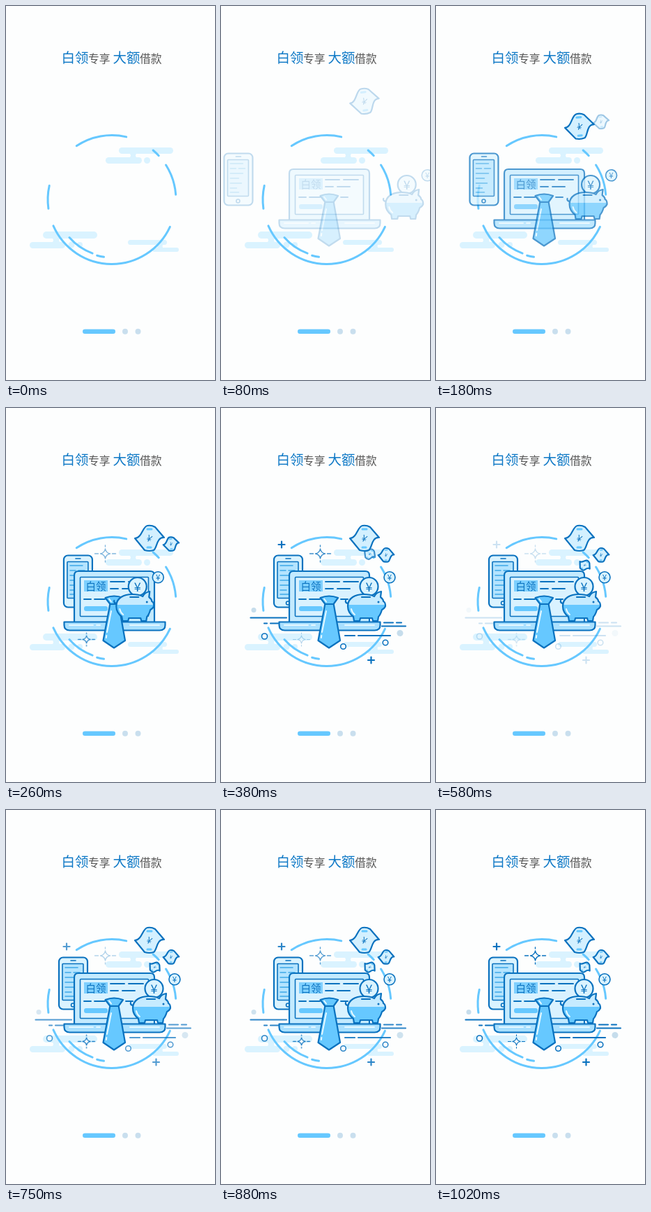
An HTML page for the animation above (1120 ms loop, 300x534 px).

```html
<!DOCTYPE html>
<html lang="zh">
<head>
<meta charset="utf-8">
<style>
  html, body { margin: 0; height: 100%; overflow: hidden; background: #fdfefe; }
  svg { display: block; width: 100vw; height: 100vh; }
  text { font-family: "Noto Sans CJK SC", "Noto Sans CJK", sans-serif; }
  .dark { stroke: #0a72bf; stroke-width: 2.2; stroke-linecap: round; stroke-linejoin: round; }
  .thin { stroke-width: 1.6; }
  .mid { stroke: #66c8ff; stroke-width: 3; stroke-linecap: round; fill: none; }
  .shine { stroke: #e6f8ff; stroke-width: 2; stroke-linecap: round; fill: none; }
  .yen { fill: #0a72bf; text-anchor: middle; font-weight: 500; }
</style>
</head>
<body>
<svg viewBox="0 0 300 534">
  <defs>
    <linearGradient id="twoTone" gradientUnits="userSpaceOnUse" x1="0" x2="0" y1="262" y2="304">
      <stop offset=".45" stop-color="#c6ebff"/>
      <stop offset=".45" stop-color="#66c8ff"/>
    </linearGradient>
    <g id="note">
      <path class="dark" vector-effect="non-scaling-stroke" fill="#d3f0ff"
        d="M-21 0C-11 0 -10 -17 -3 -18Q3 -19 8 -16L21 -1C10 -2 11 14 6 17Q0 19 -7 17Z"/>
      <path d="M-3 -13h6M-3 13h5" stroke="#66c8ff" stroke-width="3" stroke-linecap="round"/>
      <text class="yen" font-size="13" transform="rotate(25)" y="5">¥</text>
    </g>
    <path id="star" class="dark" style="stroke-width:1.4" fill="#fdfefe"
      d="M0 -12V-10M0 10V12M-15 0H-10M15 0H10M0 -7Q1 -1 7 0Q1 1 0 7Q-1 1 -7 0Q-1 -1 0 -7Z"/>
    <path id="plus" class="dark" d="M-4.500 0H4.500M0 -4.500V4.500"/>
  </defs>

  <text y="81"><tspan x="79.5" font-size="19.5" fill="#0f79c6">白领</tspan><tspan x="118" font-size="15.8" fill="#555">专享</tspan><tspan x="153.5" font-size="19.5" fill="#0f79c6">大额</tspan><tspan x="192" font-size="15.8" fill="#555">借款</tspan></text>

  <g fill="#daf3ff">
    <rect x="162" y="202" width="78" height="9" rx="4.5"/>
    <path d="M177 210h11q-4 3.500 0 7h-11q4 -3.500 0 -7z"/>
    <rect x="143" y="216" width="52" height="9" rx="4.500"/>
    <circle cx="202.500" cy="220.500" r="4.500"/>
    <rect x="53" y="322" width="78" height="10" rx="5"/>
    <path d="M66 331h12q-4 3.500 0 7h-12q4 -3.500 0 -7z"/>
    <rect x="34" y="337" width="51" height="9" rx="4.500"/>
    <circle cx="94" cy="341" r="4.500"/>
    <circle cx="106" cy="341" r="4"/>
    <rect x="175" y="334" width="56" height="7" rx="3.500"/>
    <path d="M216 340h10q-3 3 0 6h-10q3 -3 0 -6z"/>
    <rect x="210" y="345" width="38" height="6" rx="3"/>
  </g>
  <g id="ring" class="mid"></g>

  <g id="phone">
    <rect class="dark" x="76" y="210.500" width="41" height="74" rx="6" fill="#daf3ff"/>
    <rect class="dark thin" x="81" y="219.500" width="30" height="52" rx="1" fill="#b4e4ff"/>
    <path class="dark thin" d="M93 215h7"/>
    <circle class="dark thin" cx="96" cy="278.500" r="2.500" fill="#e6f8ff"/>
    <path class="mid" style="stroke-width:1.600;stroke:#3ea9e8" d="M85 225h18M85 232h8M97 232h9M85 239h18M85 246h12M85 253h16M85 260h9M85 266h12"/>
  </g>

  <g id="laptop">
    <path class="dark" d="M98 306V239q0 -6 6 -6H207q6 0 6 6V306Z" fill="#c3eaff"/>
    <rect class="dark thin" x="106.500" y="241.500" width="98" height="56" rx="1" fill="#d9f2ff"/>
    <rect x="112" y="246" width="34" height="16" fill="#7fd0ff"/>
    <text x="114.500" y="259.500" font-size="14.500" fill="#0a72bf">白领</text>
    <path class="dark" style="stroke-width:1.900" d="M150 248h20M176 248h21M150 258h11M167 258h18M112 273h10M127 273h15M172 273h10"/>
    <rect x="112" y="283" width="34" height="7" rx="3" fill="#66c8ff"/>
    <path class="dark" d="M83.500 305.500H228.500V310q0 7.500 -8 7.500H91.500q-8 0 -8 -7.500Z" fill="#a9e0ff"/>
    <path class="shine" d="M91 310h34M130 310h5M178 310h42"/>
  </g>

  <g id="tie">
    <path class="dark" d="M149.500 279L139.500 332L155 342.500L171 332L161.500 279Z" fill="#66c8ff"/>
    <path class="dark" d="M142.500 271Q155 266 168 271L161.500 280H149.500Z" fill="#66c8ff"/>
    <path class="shine" d="M151 290L145 320M144.300 325l-.5 3M148 272.500l3 4"/>
  </g>

  <g id="pig">
    <circle class="dark" cx="212.500" cy="255" r="13" fill="#daf3ff"/>
    <text class="yen" x="212.500" y="262" font-size="18">¥</text>
    <path class="dark" fill="url(#twoTone)" d="M182 283C182 271 193 266 205 266Q214 266 220 269Q223 263 230 262L229 270Q233 273 233 276Q236 277 236 283Q234 287 231 288Q229 295 226 298L225 304H218L217 300H200L199 304H191L190 298Q182 292 182 283Z"/>
    <path class="dark" fill="none" d="M182 279q-4 -1 -3 -4M202 270h12"/>
    <circle cx="226" cy="277" r="1.500" fill="#0a72bf"/>
    <path class="shine" d="M187 287q1 5 5 8"/>
    <circle class="dark thin" cx="242" cy="241.800" r="8" fill="#daf3ff"/>
    <text class="yen" x="242" y="246" font-size="11.500">¥</text>
  </g>

  <use id="note3" href="#note"/>
  <use id="note2" href="#note"/>
  <use id="note1" href="#note"/>

  <g id="deco">
    <use href="#plus" x="87" y="195"/>
    <use href="#plus" x="215.500" y="360"/>
    <path class="dark" d="M42.500 299.500H94M62 307.500H66M71 307.500H82M234 306.500H247M252 306.500H259M231 311.500H265M178 325H192M197 325H243"/>
    <circle class="dark thin" cx="62.500" cy="326" r="4" fill="#fdfefe"/>
    <circle class="dark thin" cx="175.500" cy="340.500" r="3.800" fill="#fdfefe"/>
    <circle class="dark thin" cx="236" cy="335" r="3.800" fill="#fdfefe"/>
    <g fill="#c6ddec">
      <circle cx="257" cy="321.500" r="4.500"/>
      <circle cx="47" cy="288.500" r="3.500"/>
    </g>
  </g>
  <g transform="translate(142.500 208)"><use id="star1" href="#star"/></g>
  <g transform="translate(115.500 330.500) scale(.8)"><use id="star2" href="#star"/></g>

  <rect x="110" y="461.500" width="47" height="6.500" rx="3.250" fill="#66c8ff"/>
  <circle cx="171" cy="464.700" r="4" fill="#c9dfee"/>
  <circle cx="189.500" cy="464.700" r="4" fill="#c9dfee"/>
</svg>
<script>
  const LOOP = 1120;
  const el = id => document.getElementById(id);

  // Arcs as [radius, start degree, end degree]
  const arcs = [[92, -123.5, -77], [92, -50, -43], [92, -32.5, -4.5], [92, 25, 156],
                [92, 172, 192.5], [81.5, 110, 138.5], [82.5, 98, 105]];
  const point = (r, deg) => {
    const a = deg * Math.PI / 180;
    return `${152 + r * Math.cos(a)} ${276.5 + r * Math.sin(a)}`;
  };
  el("ring").innerHTML = arcs.map(([r, a, b]) =>
    `<path d="M${point(r, a)}A${r} ${r} 0 0 1 ${point(r, b)}"/>`).join("");

  // Linear interpolation through [time, value] stops
  function track(t, ...stops) {
    if (t <= stops[0][0]) return stops[0][1];
    for (let i = 1; i < stops.length; i++) {
      const [t0, v0] = stops[i - 1], [t1, v1] = stops[i];
      if (t < t1) return v0 + (v1 - v0) * (t - t0) / (t1 - t0);
    }
    return stops.at(-1)[1];
  }

  const fade = (id, v) => el(id).setAttribute("opacity", v);
  const move = (id, v) => el(id).setAttribute("transform", v);

  function drop(id, t, x, y, scale, turn, start, end) {
    const dy = -0.36 * Math.max(0, end - t);
    const angle = turn + track(t, [end - 60, -8], [end, 0]);
    move(id, `translate(${x} ${y + dy}) rotate(${angle}) scale(${scale})`);
    fade(id, track(t, [start, 0], [start + 80, 1]));
  }

  function draw(t) {
    const show = track(t, [30, 0], [180, 0.72], [250, 1]);
    ["phone", "laptop", "tie", "pig"].forEach(id => fade(id, show));
    move("phone", `translate(${track(t, [30, -94], [180, -28], [260, 7], [350, 0])})`);
    move("pig", `translate(${track(t, [30, 77], [180, 10], [260, -24], [350, 0])})`);

    drop("note1", t, 206, 186, 1, 0, 60, 220);
    drop("note2", t, 237, 210, 0.54, 0, 150, 305);
    drop("note3", t, 213.5, 224.5, 0.42, 38, 320, 425);

    fade("deco", track(t, [300, 0], [370, 1], [430, 1], [565, 0.15], [750, 0.7], [1000, 1]));
    fade("star1", track(t, [200, 0], [260, 0.5], [350, 0.85], [420, 0.7], [565, 0.2], [750, 0.3], [1000, 1]));
    fade("star2", track(t, [200, 0], [260, 0.9], [380, 0.3], [565, 0.12], [750, 1]));
  }

  function tick() {
    draw(performance.now() % LOOP);
    requestAnimationFrame(tick);
  }
  tick();
</script>
</body>
</html>
```
